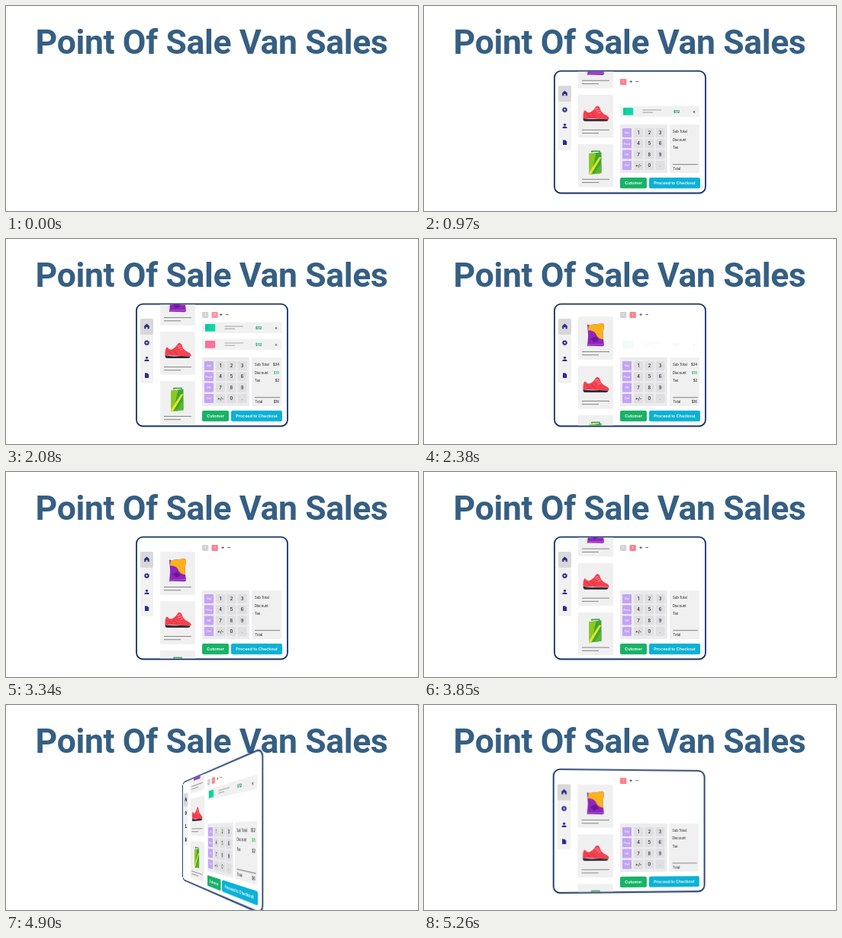
Animation, 540 px wide and 270 px high, one loop 5290 ms. Source, as an HTML page:

```html
<!DOCTYPE html>
<html lang="en">
<head>
<meta charset="utf-8">
<title>Point Of Sale Van Sales</title>
<style>
html, body { margin: 0; width: 100%; height: 100%; overflow: hidden; background: #fff; }
#stage { position: relative; width: 540px; height: 270px; overflow: hidden; perspective: 326px; perspective-origin: 270px 166px; }
h1 { position: absolute; left: 0; top: 21px; width: 539px; margin: 0; text-align: center; white-space: nowrap;
  font: 700 44.5px/54px Roboto, sans-serif; letter-spacing: -.37px; color: #355f83; }
#panel { position: absolute; left: 0; top: 0; transform-origin: 270px 166px; }
text { font: 500 4.2px Inter, sans-serif; fill: #333; }
.mid { text-anchor: middle; }
.end { text-anchor: end; }
.key { font-size: 5.6px; font-weight: 600; }
.tiny { font-size: 3.6px; fill: #fff; }
.btn { font-size: 5.4px; font-weight: 600; fill: #fff; }
.price { font-size: 4.8px; font-weight: 800; fill: #0f9b62; }
.sign { font-size: 7px; font-weight: 600; }
</style>
</head>
<body>
<div id="stage">
<h1>Point Of Sale Van Sales</h1>
<svg id="panel" width="540" height="270" viewBox="0 0 540 270">
  <defs>
    <clipPath id="inside"><rect x="172" y="86.5" width="196" height="159" rx="8"/></clipPath>
    <linearGradient id="mint"><stop stop-color="#0cc894"/><stop offset="1" stop-color="#12dcae"/></linearGradient>
  </defs>
  <rect x="171" y="85.7" width="198" height="160.8" rx="8.5" fill="#fff" stroke="#15336a" stroke-width="1.8"/>
  <g clip-path="url(#inside)">
    <g id="cards"></g>
    <rect x="176" y="105" width="17" height="85" rx="2" fill="#f2f2f3"/>
    <rect x="176" y="105" width="17" height="21" rx="2" fill="#d8d8da"/>
    <g fill="#2c2f87">
      <path d="M184.5 111.5l3.3 3v3.8h-2.2v-2.4h-2.2v2.4h-2.2v-3.8z"/>
      <circle cx="184.5" cy="136.7" r="2" fill="none" stroke="#2c2f87" stroke-width="1.7"/>
      <circle cx="184.5" cy="136.7" r="3.1" fill="none" stroke="#2c2f87" stroke-width="1" stroke-dasharray="1.22"/>
      <circle cx="184.5" cy="156.3" r="1.6"/>
      <path d="M181.5 161v-.8q0-1.7 3-1.7t3 1.7v.8z"/>
      <path d="M182 176.5h3.2l2 2v4.6H182z"/>
    </g>
    <rect id="tab1" x="257" y="96" width="8.3" height="8" rx="1"/>
    <text class="mid tiny" x="261.1" y="101.3">1</text>
    <g id="tab2">
      <rect x="269.5" y="96" width="8.3" height="8" rx="1" fill="#ff7f8b"/>
      <text class="mid tiny" x="273.6" y="101.3">2</text>
    </g>
    <g id="signs">
      <text class="mid sign" x="271" y="102.4">+</text>
      <text class="mid sign" x="279" y="102.4">−</text>
    </g>
    <g id="items"></g>
    <g id="calc"></g>
    <rect x="322" y="156" width="39" height="64" rx="1" fill="#f0f0f1"/>
    <text x="326" y="167">Sub Total</text>
    <text x="326" y="177.5">Discount</text>
    <text x="326" y="188">Tax</text>
    <path d="M326 208.7h33" stroke="#666" stroke-width=".8"/>
    <text x="326.5" y="215.7">Total</text>
    <g id="sums"></g>
    <rect x="257" y="226" width="35" height="14.2" rx="2" fill="#18b268"/>
    <text class="mid btn" x="274.5" y="235">Cutomer</text>
    <rect x="295" y="226" width="67" height="14.2" rx="2" fill="#0cb1d5"/>
    <text class="mid btn" x="328.5" y="235">Proceed to Checkout</text>
  </g>
</svg>
</div>
<script>
const $ = id => document.getElementById(id);
const LOOP = 5290, SWAP = 4915;

const bag = `<path d="M12 10l2 1 18-2 2 1-1.5 14L34 38l-2 1-18-.5-2 .5 1.2-14z" fill="#8f25bd"/>
  <path d="M14 11l18-2 2 1-1.5 14 .6 6Q25 29 23 22 20 18 13 18z" fill="#fbb21a"/>
  <path d="M16 29l7-3 4 5-6 3z" fill="#6d1798"/><path d="M12.5 37l21-.4" stroke="#b45bd8"/>`;
const shoe = `<path d="M6.5 31Q6 25 8 20.5l2 .3q1.5 3 5 2.4 5-2 8.500-8l2-.7 2.500 1.500 2 5.500q3 4 7 5.500 4 1.500 3.500 5z" fill="#f5414f"/>
  <path d="M17 23.500l6 7M11 25l5 5" stroke="#cf2b3b" stroke-width=".9"/>
  <path d="M22.500 19l4-1M24 21.500l4-1M26 24l3.500-1" stroke="#ffc1c5" stroke-width=".7"/>
  <path d="M6.500 31Q15 32.500 22 32t17.500.3q0 2.200-3 2.500H9Q6.500 34.500 6.500 31z" fill="#2d2b38"/>`;
const can = `<path d="M18 11V9.300h10V11" fill="none" stroke="#2f9d3a" stroke-width="1.500"/>
  <path d="M14.500 12.500L30.500 10.500V38L14.500 40z" fill="#3fa535"/>
  <path d="M14.500 12.500l9-1.100-4 19-5 7z" fill="#8cc820"/>
  <path d="M14.500 37l13-20h3L17 39.700l-2.500.3z" fill="#e2e22c"/>
  <path d="M21 39.200l9.500-15V38z" fill="#5fb62f"/>`;

$('cards').innerHTML = [bag, shoe, can].map((art, i) =>
  `<g transform="translate(202 ${105.3 + 65 * i})"><rect width="46" height="56.5" rx="1" fill="#f0f0f1"/>${art}
  <path d="M5 46.3h36M5 50.5h22" stroke="#777" stroke-width=".9"/></g>`).join('');

$('items').innerHTML = ['url(#mint)', '#f95f8c'].map((fill, i) =>
  `<g id="item${i}"><rect x="257" y="109.5" width="104" height="14.5" fill="#f1f1f2"/>
  <rect x="261" y="112" width="13.3" height="9.8" rx="1" fill="${fill}"/>
  <path d="M286.5 115h24.5M286.5 118.2h13.5" stroke="#888" stroke-width=".8"/>
  <text class="price" x="327" y="118.5">$12</text><text class="mid" x="354" y="118.8" style="font-size:6px">×</text></g>`).join('');

const rows = ['Qty 1 2 3', 'Price 4 5 6', 'Off 7 8 9', 'Del +/- 0 .'];
$('calc').innerHTML = '<rect x="257" y="156" width="62" height="64" rx="1" fill="#ececee"/>' +
  rows.map((row, r) => row.split(' ').map((label, c) => {
    const x = c ? 261 + 14.2 * c : 260, y = 161 + 14.3 * r;
    return `<rect x="${x}" y="${y}" width="12" height="12" rx="1" fill="${c ? '#dfdfe2' : '#c3a3f7'}"/>
      <text class="mid ${c ? 'key' : 'tiny'}" x="${x + 6}" y="${y + (c ? 8 : 7.3)}">${label}</text>`;
  }).join('')).join('');

const sumY = [167, 177.5, 188, 215.7];
$('sums').innerHTML = sumY.map((y, i) =>
  `<text class="end" x="358" y="${y}" style="font-weight:600${i == 1 ? ';fill:#22b45f' : ''}"></text>`).join('');
const sums = [...$('sums').children];

const inOut = x => x < .5 ? 8 * x ** 4 : 1 - 8 * (1 - x) ** 4;
const move = (id, x, y) => $(id).setAttribute('transform', `translate(${x} ${y})`);

function draw(t) {
  const s = t < SWAP ? t : 0;   // the cart is reset halfway through the flip
  const ramp = (from, length) => Math.min(1, Math.max(0, (s - from) / length));
  const ease = (from, length) => inOut(ramp(from, length));
  const second = s > 2700;

  move('cards', 0, -54 * (ease(730, 300) - ease(1800, 820) + ease(3250, 860)));

  const tab = ease(1820, 420);
  $('tab1').setAttribute('fill', tab > .5 ? '#d3d3d6' : '#ff7f8b');
  $('tab2').setAttribute('opacity', tab);
  move('signs', 13 * tab, 0);

  const rise = ease(980, 260) - ease(2080, 220) + ease(4050, 260);
  move('item0', 0, 22 * (1 - rise));
  $('item0').setAttribute('opacity', ramp(850, 110) - ramp(2250, 140) + ramp(3900, 140));
  move('item1', 0, 22);
  $('item1').setAttribute('opacity', ramp(1290, 160) - ramp(2060, 160));

  const values = second ? ['$12', '$8', '$2', '$6'] : ['$24', '$10', '$2', '$16'];
  sums.forEach((el, i) => {
    el.textContent = values[i];
    el.setAttribute('opacity', second ? ramp(4200 + 125 * i, 120)
      : ramp(1490 + 150 * i, 130) - ramp(2420, 200));
  });

  const angle = t < SWAP ? -90 * Math.max(0, (t - 4746) / 177) ** 3
    : 62 * (1 - (t - SWAP) / 528) ** 3;
  $('panel').style.transform = angle ? `rotateY(${angle}deg)` : 'none';
  $('panel').style.visibility = t < 100 ? 'hidden' : 'visible';
}

const start = performance.now();
function tick() {
  draw((performance.now() - start) % LOOP);
  requestAnimationFrame(tick);
}
tick();
</script>
</body>
</html>
```
